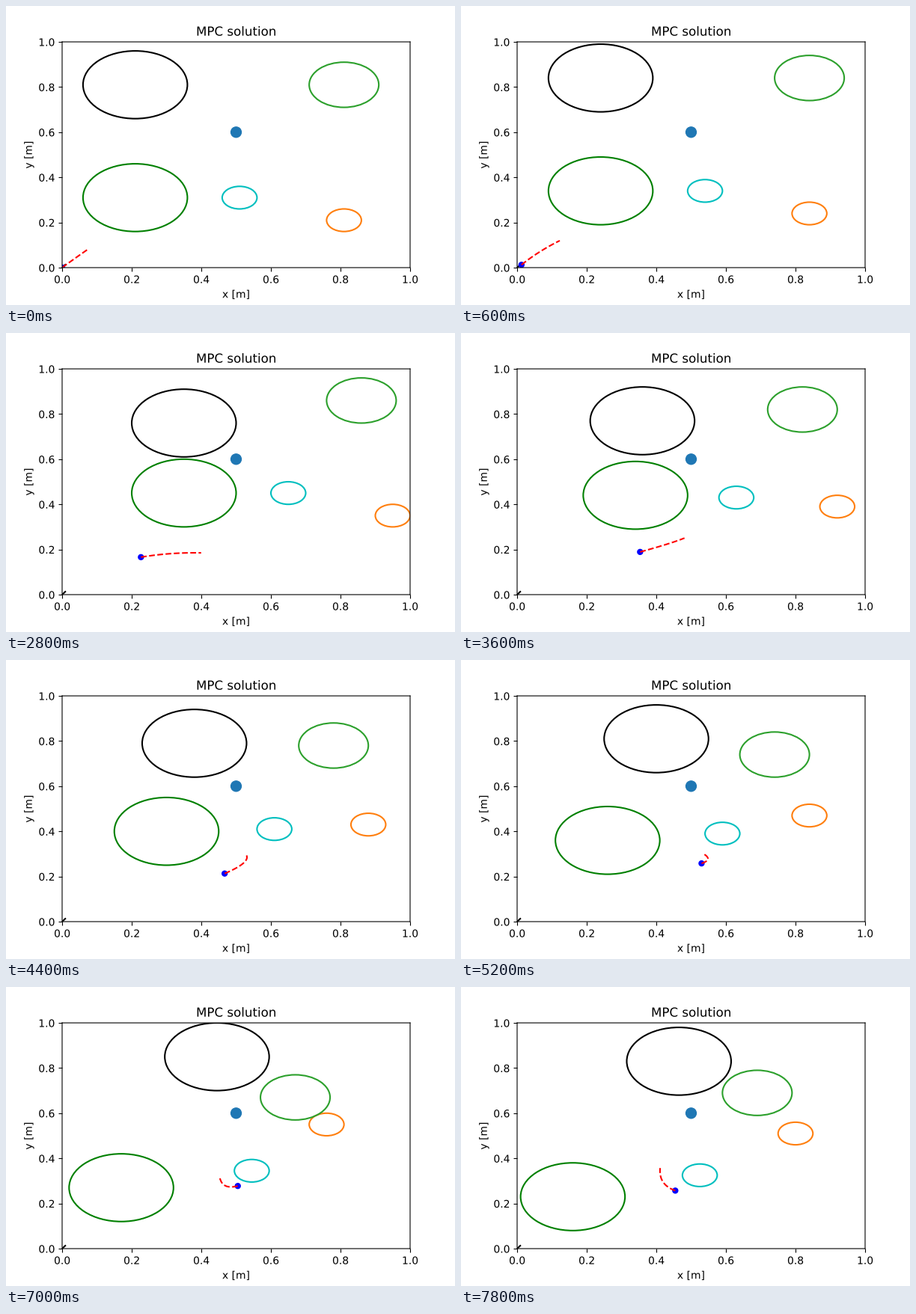
A matplotlib script for the animation above (8000 ms loop, 600 by 400 pixels).

```python
import numpy as np
import matplotlib.pyplot as plt
from matplotlib.animation import FuncAnimation
from matplotlib.patches import Circle
from matplotlib.patheffects import Normal

# Place lines, markers and text at exact, unrounded positions.
plt.rcParams["path.snap"] = False
plt.rcParams["path.effects"] = [Normal()]

STEPS, STEP_MS = 40, 200

# step | robot x, y | offsets to the middle and the end of its planned path
KEYS = np.array([
    (0, 0, 0, .036, .040, .072, .079),
    (3, .0125, .0125, .052, .057, .110, .107),
    (10, .1235, .1235, .085, .034, .155, .019),
    (14, .2265, .166, .085, .0155, .173, .019),
    (22, .467, .213, .056, .049, .059, .088),
    (26, .530, .258, .018, .018, .008, .040),
    (30, .546, .287, -.021, -.022, -.042, -.0105),
    (39, .4545, .257, -.035, .038, -.0435, .100),
])


# Obstacle centres in hundredths of a metre: straight runs joined by
# min at an upper turning point and by max at a lower one.
def black(k):
    return (min(21 + k, max(35, 27 + k / 2)),
            min(81 + k, max(90 - k, min(68 + k / 2, 102.5 - k / 2))))


def green(k):
    return min(21 + k, max(52 - k, k - 23)), 31 + min(k, 31 - k)


def cyan(k):
    shift = min(k, 21 - k / 2)
    return 51 + shift, 31 + shift


def orange(k):
    return min(81 + k, max(110 - k, 41 + k)), 21 + min(k, 69 - k)


def lime(k):
    c = min(81 + k, max(100 - k, 49.5 + k / 2))
    return c, c


OBSTACLES = [(black, "k", .15), (green, "g", .15), (cyan, "c", .05),
             (orange, "C1", .05), (lime, "C2", .10)]


def spline(knots, values, t):
    """Cubic Hermite curve through rows of values at the knots."""
    slopes = np.gradient(values, knots, axis=0)
    i = min(np.searchsorted(knots, t, side="right") - 1, len(knots) - 2)
    h = knots[i + 1] - knots[i]
    u = (t - knots[i]) / h
    ease = u * u * (3 - 2 * u)
    return ((1 - ease) * values[i] + ease * values[i + 1]
            + h * u * (1 - u) * ((1 - u) * slopes[i] - u * slopes[i + 1]))


fig, ax = plt.subplots(figsize=(6, 4), dpi=100)
fig.subplots_adjust(left=0.125, right=0.9, bottom=0.125, top=0.88)
ax.set(xlim=(0, 1), ylim=(0, 1), xlabel="x [m]", ylabel="y [m]",
       title="MPC solution")

ax.plot(0.5, 0.6, "o", color="C0", markersize=10)
ax.plot([0, 0.009], [0, 0.013], "k", lw=1.5)
rings = [ax.add_patch(Circle((0, 0), r, fill=False, ec=color, lw=1.5))
         for _, color, r in OBSTACLES]
robot, = ax.plot([], [], "bo", markersize=5)
plan, = ax.plot([], [], "r--", lw=1.5)
s = np.linspace(0, 1, 41)[:, None]


def update(k):
    for ring, (centre, _, _) in zip(rings, OBSTACLES):
        ring.center = np.array(centre(k)) / 100
    pos, mid, end = spline(KEYS[:, 0], KEYS[:, 1:], k).reshape(3, 2)
    robot.set_data(pos[:1], pos[1:])
    # parabola from the robot through the middle to the end
    plan.set_data(*(pos + 4 * s * (1 - s) * mid + s * (2 * s - 1) * end).T)
    return [*rings, robot, plan]


anim = FuncAnimation(fig, update, frames=STEPS, interval=STEP_MS,
                     repeat=True, repeat_delay=0)
plt.show()
```
